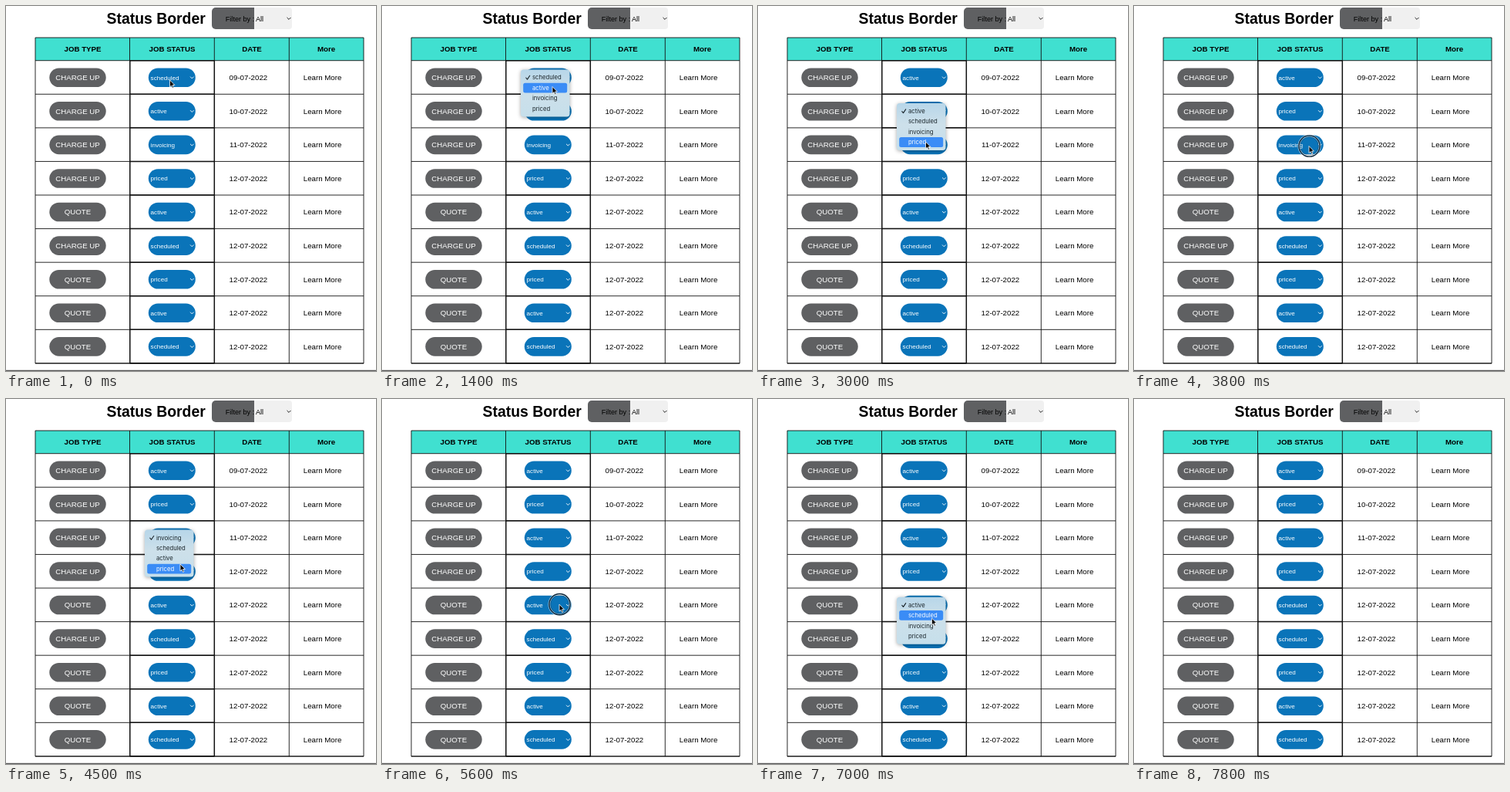
Animation of 480 by 473 pixels, one loop 8000 ms. Source, as an HTML page:

```html
<!DOCTYPE html>
<html lang="en">
<head>
<meta charset="utf-8">
<title>Status Border</title>
<style>
  html, body { margin: 0; width: 100%; height: 100%; overflow: hidden; background: #fff; }
  svg { display: block; width: 100%; height: 100%; font: 9.7px "Liberation Sans", Arial, sans-serif; }
  .mid { text-anchor: middle; }
  .bold { font-weight: bold; }
  .title { font-size: 19.4px; }
  .small { font-size: 8.1px; fill: #fff; }
  .filter { font-size: 9.1px; }
  .item { font: 7.7px Inter, "Open Sans", sans-serif; }
  .line { stroke: #111; fill: none; }
  .mark { fill: none; stroke-linecap: round; stroke-linejoin: round; }
  #panel { filter: drop-shadow(0 1.5px 2.5px rgba(0, 0, 0, .35)); }
</style>
</head>
<body>
<svg id="stage" viewBox="0 0 480 473">
  <defs>
    <linearGradient id="glass" x1="0" y1="0" x2="0" y2="1">
      <stop offset="0" stop-color="#b7d6e9"/>
      <stop offset=".45" stop-color="#cde0ea"/>
      <stop offset="1" stop-color="#c6dfeb"/>
    </linearGradient>
  </defs>
  <rect y="471.8" width="480" height="1.2" fill="#555"/>
  <text class="bold title" x="130.5" y="23">Status Border</text>
  <path d="M322 2H272a5 5 0 0 0-5 5V25a5 5 0 0 0 5 5H322Z" fill="#5f6062"/>
  <path d="M322 2H367a4 4 0 0 1 4 4V26a4 4 0 0 1-4 4H322Z" fill="#f0f0f0"/>
  <text class="filter" x="284.8" y="19.5">Filter by :</text>
  <text class="filter" x="324" y="19.5">All</text>
  <path class="mark" d="M364.8 15.2l2.2 2.2 2.2-2.2" stroke="#222" stroke-width="1"/>
  <rect x="38" y="41" width="426" height="29.7" fill="#40e0d0"/>
  <g id="table"></g>
  <g id="menu">
    <rect id="panel" x="180" y="-10.3" width="63.5" height="61" rx="4" fill="url(#glass)"/>
    <rect id="hover" x="183.2" width="57" height="12.8" rx="2.5" fill="#3a8cf6"/>
    <path id="check" class="mark" d="M186.8 .3l1.7 2.1 3.2-4.8" stroke-width="1.1"/>
  </g>
  <g id="ring" fill="none">
    <circle r="13.6" stroke="#fff" stroke-opacity=".55" stroke-width="3"/>
    <circle r="13.6" stroke="#0b2438" stroke-width="1.4"/>
    <circle r="11.8" stroke="#0b2438" stroke-opacity=".45" stroke-width=".7"/>
  </g>
  <path id="cursor" d="M0 0V9L2.1 7.1 3.5 10.3 5 9.7 3.6 6.5H6.4Z"
        fill="#000" stroke="#fff" stroke-width=".8" stroke-linejoin="round"/>
</svg>
<script>
const LOOP = 8000, STEP = 100, PITCH = 43.58, ITEM = 13.4;
const OPTIONS = ["scheduled", "active", "invoicing", "priced"];
const START = [0, 1, 2, 3, 1, 0, 3, 1, 0];
const JOBS = [0, 0, 0, 0, 1, 0, 1, 1, 1];

// each pick: row, time the menu opens, time it closes, new option
const PICKS = [
  { row: 0, open: 800, close: 1700, value: 1 },
  { row: 1, open: 2400, close: 3300, value: 3 },
  { row: 2, open: 3900, close: 5100, value: 1 },
  { row: 4, open: 5700, close: 7300, value: 0 }
];
const CLICKS = PICKS.flatMap(p => [p.open - 200, p.close - 200]);
const HIDE = 7500;

// time, x, y of the pointer tip
const PATH = [
  [0, 212.5, 96], [500, 219, 92], [900, 220, 93], [1400, 221, 104.5], [1800, 221, 104.5],
  [2200, 226, 136], [2500, 225, 138], [3000, 217.5, 176], [3300, 217.5, 176],
  [3700, 227, 181], [4000, 227, 183], [4500, 226, 214], [4850, 224, 208], [5100, 224, 207],
  [5500, 230, 266], [5900, 230, 267], [6600, 225.5, 284], [8000, 225, 284]
];

const $ = id => document.getElementById(id);
const table = $("table"), menu = $("menu");
const centre = row => 92.7 + PITCH * row;

function add(parent, tag, attrs, text = "") {
  const el = document.createElementNS("http://www.w3.org/2000/svg", tag);
  for (const k in attrs) el.setAttribute(k, attrs[k]);
  el.textContent = text;
  return parent.appendChild(el);
}
const mid = (x, y, text, more = {}) => add(table, "text", { class: "mid", x, y, ...more }, text);
const pill = (x, y, width, height, fill) =>
  add(table, "rect", { x, y: y - height / 2, width, height, rx: height / 2, fill });
const show = (el, on) => { el.style.display = on ? "" : "none"; };
const move = (el, x, y) => el.setAttribute("transform", `translate(${x} ${y})`);

[["JOB TYPE", 99.5], ["JOB STATUS", 215.5], ["DATE", 319], ["More", 415.5]]
  .forEach(([name, x]) => mid(x, 59.3, name, { class: "mid bold" }));

const labels = START.map((_, row) => {
  const y = centre(row);
  pill(56.3, y, 73.4, 24.6, "#5f6062");
  mid(93, y + 3.4, JOBS[row] ? "QUOTE" : "CHARGE UP", { fill: "#fff" });
  pill(184.8, y, 61, 24.6, "#0a74b9");
  add(table, "path", { class: "mark", d: `M239.3 ${y - .8}l2 2 2-2`, stroke: "#fff", "stroke-width": .9 });
  mid(314.4, y + 3.4, `${String(Math.min(9 + row, 12)).padStart(2, "0")}-07-2022`);
  mid(410.6, y + 3.4, "Learn More");
  return add(table, "text", { class: "small", x: 187.6, y: y + 3 });
});

let grid = "M38 41H464V463.2H38ZM160.5 41V71M270.3 41V71M367.3 41V463.2";
let frame = "M160.8 70.7V463.2M270.3 70.7V463.2";
for (let i = 0; i <= START.length; i++) {
  const y = 70.7 + PITCH * i;
  grid += `M38 ${y}H464`;
  frame += `M160.8 ${y}H270.3`;
}
add(table, "path", { class: "line", d: grid, "stroke-width": .9 });
add(table, "path", { class: "line", d: frame, "stroke-width": 1.5 });

const items = OPTIONS.map((_, i) => add(menu, "text", { class: "item", x: 195, y: ITEM * i + 2.7 }));

function pointer(t) {
  const i = PATH.findIndex(p => p[0] > t);
  const [t0, x0, y0] = PATH[i - 1], [t1, x1, y1] = PATH[i];
  const u = (t - t0) / (t1 - t0), e = u * u * (3 - 2 * u);
  return [x0 + (x1 - x0) * e, y0 + (y1 - y0) * e];
}

function draw(t) {
  const [x, y] = pointer(t);
  const values = START.slice();
  PICKS.forEach(p => { if (t >= p.close) values[p.row] = p.value; });
  labels.forEach((el, row) => { el.textContent = OPTIONS[values[row]]; });

  const pick = PICKS.find(p => t >= p.open && t < p.close);
  show(menu, pick);
  if (pick) {
    const top = centre(pick.row), first = values[pick.row];
    const list = [first, ...[0, 1, 2, 3].filter(v => v !== first)];
    const at = Math.max(0, Math.min(3, Math.floor((y - top) / ITEM + .5)));
    const ink = i => i === at ? "#fff" : "#1b262c";
    move(menu, 0, top);
    $("hover").setAttribute("y", ITEM * at - 6.4);
    $("check").setAttribute("stroke", ink(0));
    items.forEach((el, i) => {
      el.textContent = OPTIONS[list[i]];
      el.setAttribute("fill", ink(i));
    });
  }
  show($("ring"), CLICKS.some(c => t >= c && t < c + 200));
  move($("ring"), x + .5, y);
  show($("cursor"), t < HIDE);
  move($("cursor"), x, y);
}

const began = performance.now();
function tick() {
  const t = Math.max(0, performance.now() - began) % LOOP;
  draw(Math.floor(t / STEP) * STEP);
  requestAnimationFrame(tick);
}
tick();
</script>
</body>
</html>
```
